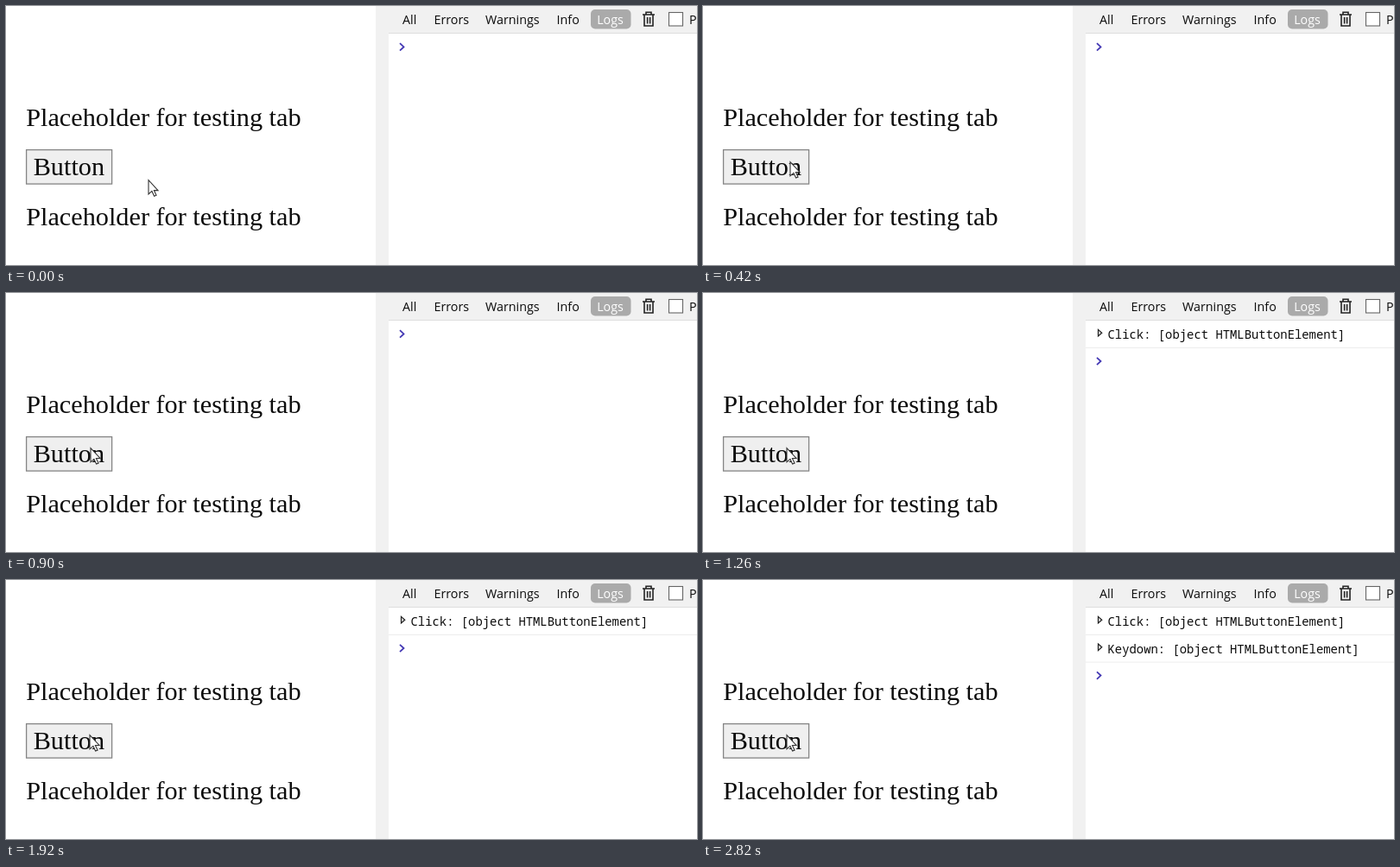
An HTML page for the animation above (2.88 s loop, 800 by 300 pixels).

```html
<!DOCTYPE html>
<html lang="en">
<head>
<meta charset="utf-8">
<title>Button event log</title>
<style>
  html, body { margin: 0; width: 100%; height: 100%; overflow: hidden; background: #fff; }
  svg { display: block; }
  .page { font: 30.25px "Liberation Serif", "Times New Roman", serif; fill: #0c0c0c; }
  .bar { font: 14.3px "Open Sans", "Noto Sans", sans-serif; fill: #0c0c0c; }
  .log { font: 13.88px "Noto Sans Mono", "DejaVu Sans Mono", monospace; fill: #0c0c0c; white-space: pre; }
</style>
</head>
<body>
<svg width="800" height="300" viewBox="0 0 800 300">
  <rect width="800" height="300" fill="#fff"/>

  <g class="page">
    <text x="23.2" y="139">Placeholder for testing tab</text>
    <rect x="23.6" y="166.6" width="99" height="39.5" fill="#efefef" stroke="#858585" stroke-width="1.3"/>
    <text x="31.7" y="196">Button</text>
    <text x="23.2" y="254">Placeholder for testing tab</text>
  </g>

  <path d="M428 0H800V31H443V300H428Z" fill="#f1f1f1"/>
  <path d="M443 31.5H800" stroke="#dedede"/>
  <g class="bar">
    <text x="459" y="21">All</text>
    <text x="495.5" y="21">Errors</text>
    <text x="555" y="21">Warnings</text>
    <text x="637.6" y="21">Info</text>
    <rect x="677" y="4" width="46.5" height="22.5" rx="5" fill="#aaa"/>
    <text x="684.2" y="21" fill="#fff">Logs</text>
    <text x="791" y="21">P</text>
  </g>
  <g fill="none" stroke="#222" stroke-width="1.6">
    <path d="M737 10H751M741 10V7.3H747V10M739 10.5V23H749V10.5M742.6 13V20.5M745.6 13V20.5"/>
    <rect x="767.5" y="7.5" width="16" height="15.5" fill="#fff" stroke="#666" stroke-width="1.1"/>
  </g>

  <g id="rows"></g>
  <path id="prompt" d="M456 43.2L460.5 47.4L456 51.6" fill="none" stroke="#4338b4" stroke-width="1.8"/>
  <path id="cursor" d="M0 0V16.2L3.9 12.7L6.6 18.5L9 17.5L6.4 11.9H11Z" fill="#fff" stroke="#333" stroke-width="1.1"/>
</svg>
<script>
  const LOOP = 2880, ROW_HEIGHT = 31.6, STEP = 60;
  const entries = [
    { at: 1020, name: "Click" },
    { at: 2280, name: "Keydown" }
  ];
  // time, x, y of the pointer tip
  const pointerPath = [[0, 165, 201.7], [420, 101, 180.6], [900, 98, 179.6], [1140, 97, 179.6]];

  const rows = document.getElementById("rows");
  const prompt = document.getElementById("prompt");
  const cursor = document.getElementById("cursor");

  rows.innerHTML = entries.map(({ name }, i) => `
    <g transform="translate(0 ${i * ROW_HEIGHT})" visibility="hidden">
      <path d="M457.5 42.4L461.8 46.2L457.5 50Z" fill="#ddd" stroke="#222" stroke-width="1.2"/>
      <text class="log" x="468.5" y="53">${name}: [object HTMLButtonElement]</text>
      <path d="M443 63.5H800" stroke="#ededed"/>
    </g>`).join("");

  const smooth = u => u * u * (3 - 2 * u);

  function pointerAt(t) {
    const next = pointerPath.findIndex(p => p[0] > t);
    if (next < 0) return pointerPath[pointerPath.length - 1].slice(1);
    const [t0, x0, y0] = pointerPath[next - 1];
    const [t1, x1, y1] = pointerPath[next];
    const u = smooth((t - t0) / (t1 - t0));
    return [x0 + (x1 - x0) * u, y0 + (y1 - y0) * u];
  }

  function draw(t) {
    let count = 0;
    entries.forEach((entry, i) => {
      const shown = t >= entry.at;
      rows.children[i].setAttribute("visibility", shown ? "visible" : "hidden");
      count += shown;
    });
    prompt.setAttribute("transform", `translate(0 ${count * ROW_HEIGHT})`);
    cursor.setAttribute("transform", `translate(${pointerAt(t).join(" ")})`);
  }

  const start = performance.now();
  function tick() {
    const t = (performance.now() - start) % LOOP;
    draw(Math.floor(t / STEP) * STEP);
    requestAnimationFrame(tick);
  }
  draw(0);
  requestAnimationFrame(tick);
</script>
</body>
</html>
```
